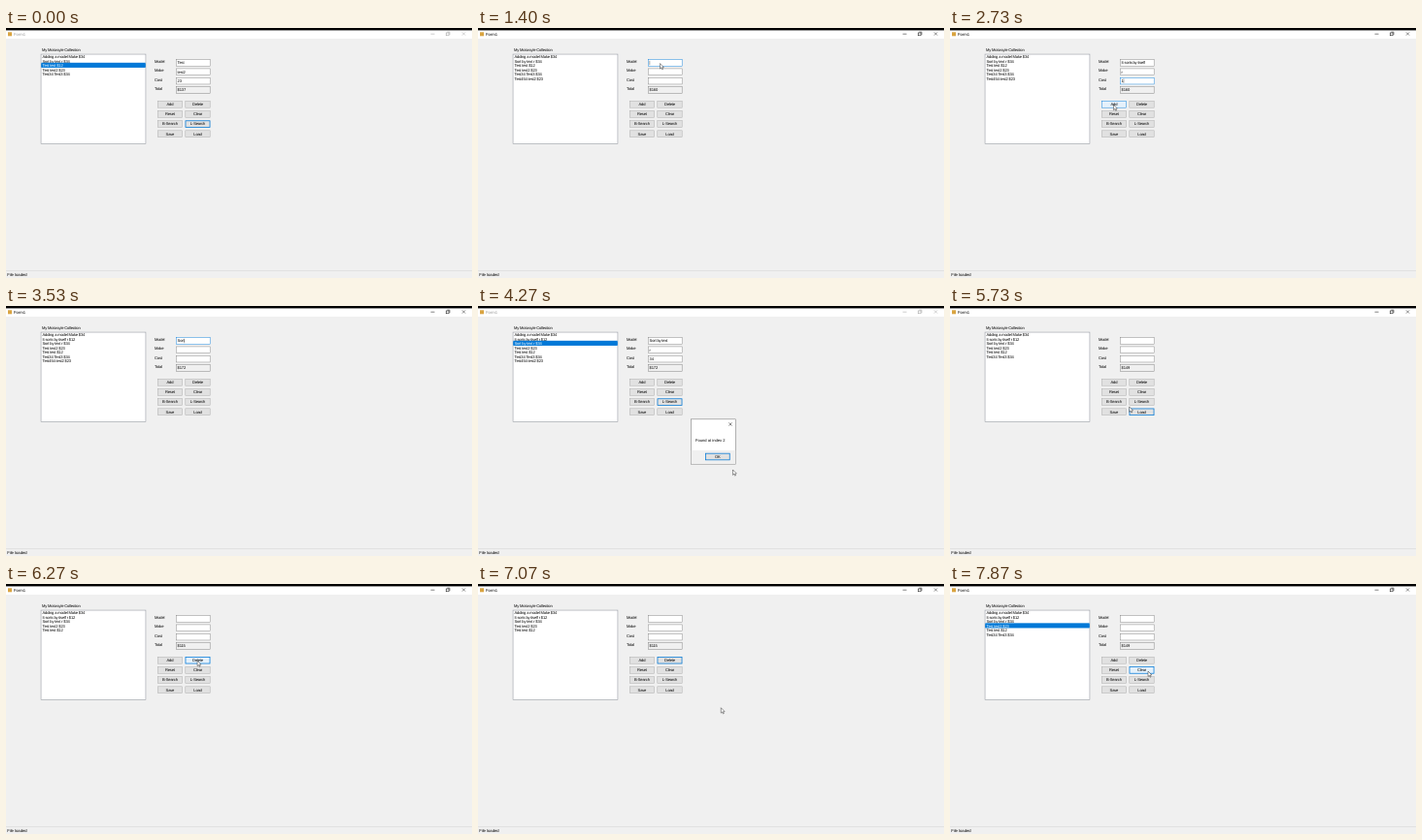
An HTML page with a canvas that plays this animation: 480x258 px, repeating every 7940 ms.

```html
<!DOCTYPE html>
<html lang="en">
<head>
<meta charset="utf-8">
<title>Form demo</title>
<style>
  html, body { margin: 0; width: 100%; height: 100%; overflow: hidden; background: #f0f0f0; }
  canvas { display: block; width: 480px; height: 258px; }
</style>
</head>
<body>
<canvas id="stage"></canvas>
<script>
const LOOP = 7940, TICK = 1000 / 15, MOVE = 330;
const BLUE = '#0078d7', FACE = '#f0f0f0';
const canvas = document.getElementById('stage');
const ctx = canvas.getContext('2d');
const ratio = window.devicePixelRatio || 1;
canvas.width = 480 * ratio;
canvas.height = 258 * ratio;
ctx.scale(ratio, ratio);
ctx.textBaseline = 'middle';
ctx.textRendering = 'geometricPrecision';

// Layout rules
const rowY = n => 27.6 + 4.55 * n;
const fields = ['Model', 'Make', 'Cost', 'Total'].map((name, i) =>
  ({ name, x: 175, y: 32.4 + 9.3 * i, w: 35.4, h: 7.2 }));
const buttons = ['Add', 'Delete', 'Reset', 'Clear', 'B-Search', 'L-Search', 'Save', 'Load'].map((name, i) =>
  ({ name, x: 156 + 28.6 * (i % 2), y: 75 + 10.2 * Math.floor(i / 2), w: 25.8, h: 7.4 }));
const okButton = { name: 'OK', x: 234, y: 151.8, w: 25.6, h: 7.4 };

// The form's behaviour
const bike = (Model, Make, Cost) => ({ Model, Make, Cost });
const start = {
  ...bike('Test', 'test2', '23'),
  bikes: [bike('Adding a model', 'Make', '34'), bike('Sort by text', 'r', '34'),
    bike('Test', 'test', '12'), bike('Test', 'test2', '23'), bike('Test34', 'Test3', '34')],
  pick: 2, focus: 'L-Search', active: false, dialog: '', status: 'File loaded'
};

function reset(s) {
  Object.assign(s, bike('', '', ''), { pick: -1 });
}
function add(s) {
  s.bikes = [...s.bikes, bike(s.Model, s.Make, s.Cost)];
  reset(s);
}
function sort(s) {
  s.bikes = [...s.bikes].sort((a, b) =>
    a.Model.localeCompare(b.Model) || b.Make.localeCompare(a.Make));
}
function remove(s) {
  s.bikes = s.bikes.filter((_, i) => i !== s.pick);
  reset(s);
}
function save(s) {
  s.saved = s.bikes;
  s.status = 'File saved';
}
function load(s) {
  s.bikes = s.saved;
  s.status = 'File loaded';
}
function pick(s, n) {
  Object.assign(s, s.bikes[n], { pick: n });
}
function show(s, message) {
  s.dialog = message;
  s.active = !message;
}

// Events: the pointer reaches its target at the given time.
const go = (at, target, act = () => {}) => ({ at, target, act });
const click = (at, target, act = () => {}) =>
  go(at, target, s => { s.focus = target; act(s); });
const choose = (at, n) => go(at, n, s => { s.focus = ''; pick(s, n); });
const type = (at, until, field, text, from = 0) => ({
  at, typing: true,
  act(s, t) {
    const k = Math.min(1, (t - at) / (until - at));
    s.focus = field;
    s[field] = text.slice(0, from + Math.floor((text.length - from) * k));
  }
});

const story = [
  go(130, [207, 155], s => { s.active = true; }),
  click(400, 'Model'),
  type(470, 670, 'Model', 'Test454', 4),
  click(1000, 'Add', add),
  click(1400, 'Model'),
  type(1600, 2060, 'Model', 'It sorts by itself'),
  type(2130, 2270, 'Make', 'r'),
  type(2330, 2800, 'Cost', '12'),
  go(2670, 'Add'),
  click(2800, 'Add', s => show(s, 'Model added')),
  go(2930, 'OK', s => show(s, '')),
  go(3070, [270, 159], s => { add(s); sort(s); }),
  click(3370, 'Model'),
  type(3400, 3800, 'Model', 'Sort by text'),
  click(4070, 'L-Search', s => { pick(s, 2); show(s, 'Found at index 2'); }),
  go(4270, [262.5, 169]),
  go(4330, 'OK', s => show(s, '')),
  choose(4730, 6),
  click(4930, 'Delete', remove),
  go(5070, [142, 63]),
  click(5400, 'Save', save),
  click(5670, 'Load', load),
  choose(6000, 5),
  click(6270, 'Delete', remove),
  go(6600, [203, 116]),
  go(6930, [257, 130]),
  click(7330, 'Load', load),
  choose(7600, 3),
  click(7800, 'Clear', s => { Object.assign(s, bike('', '', '')); }),
  go(7870, [204, 90])
];
const stops = story.filter(e => 'target' in e);

function spot(target) {
  if (Array.isArray(target)) return target;
  if (typeof target === 'number') return [75, rowY(target) + 2];
  const { x, y } = [...fields, ...buttons, okButton].find(b => b.name === target);
  return [x + 12.5, y + 4.2];
}

function pointerAt(t) {
  const past = stops.filter(e => e.at <= t), prev = past[past.length - 1];
  if (!prev) return null;
  const next = stops[past.length] || prev;
  const begin = Math.max(prev.at, next.at - MOVE);
  const typing = story.some(e => e.typing && e.at > prev.at && e.at <= t);
  if (typing && t < begin) return null;
  const part = next === prev || t < begin ? 0 : (t - begin) / (next.at - begin);
  const k = (1 - Math.cos(Math.PI * part)) / 2;
  const [x0, y0] = spot(prev.target), [x1, y1] = spot(next.target);
  return { x: x0 + (x1 - x0) * k, y: y0 + (y1 - y0) * k };
}

// Drawing helpers
function text(str, x, y, { size = 4.1, spacing = -0.17, color = '#000', align = 'left' } = {}) {
  ctx.font = `${size}px "Liberation Sans", Arial, sans-serif`;
  ctx.letterSpacing = `${spacing}px`;
  ctx.fillStyle = color;
  ctx.textAlign = align;
  ctx.fillText(str, x, y);
}

function rect(x, y, w, h, fill, stroke, line = 0.5) {
  ctx.fillStyle = fill;
  ctx.fillRect(x, y, w, h);
  if (!stroke) return;
  ctx.strokeStyle = stroke;
  ctx.lineWidth = line;
  ctx.strokeRect(x + line / 2, y + line / 2, w - line, h - line);
}

function lines(color, width, ...segments) {
  ctx.strokeStyle = color;
  ctx.lineWidth = width;
  ctx.beginPath();
  for (const [x0, y0, x1, y1] of segments) {
    ctx.moveTo(x0, y0);
    ctx.lineTo(x1, y1);
  }
  ctx.stroke();
}

function cross(x, y, r, color) {
  lines(color, 0.45, [x - r, y - r, x + r, y + r], [x - r, y + r, x + r, y - r]);
}

function button({ name, x, y, w, h }, focused, hot) {
  const edge = focused || hot ? BLUE : '#adadad';
  rect(x, y, w, h, hot ? '#e5f1fb' : '#e1e1e1', edge, focused ? 0.75 : 0.45);
  text(name, x + w / 2, y + h / 2 + 0.2, { align: 'center' });
}

function drawWindow(s) {
  rect(0, 0, 480, 258, FACE);
  rect(0, 0, 480, 11, '#fff');
  rect(0, 0, 480, 2.4, '#000');
  rect(2, 4.3, 4, 4, '#d9a441');
  const ink = s.active ? '#000' : '#999';
  text('Form1', 8, 6.6, { size: 4.2, spacing: 0, color: ink });
  lines(ink, 0.5, [437.5, 6.2, 441.5, 6.2]);
  ctx.strokeRect(453.3, 5, 2.8, 2.8);
  lines(ink, 0.5, [454.3, 4.2, 457, 4.2], [457, 4.2, 457, 7]);
  cross(471.5, 6, 1.6, ink);
  lines('#d7d7d7', 0.6, [0, 250.5, 480, 250.5]);
  text(s.status, 1.2, 254.8, { size: 4.2, spacing: 0 });
}

function drawList(s) {
  text('My Motorcyle Collection', 37, 22.6);
  rect(35.8, 26.8, 108.4, 92.8, '#fff', '#828790');
  s.bikes.forEach(({ Model, Make, Cost }, i) => {
    const picked = i === s.pick;
    if (picked) rect(36.4, rowY(i) - 0.9, 107.2, 4.55, BLUE);
    if (picked) rect(36.4, rowY(i), 107.2, 4.2, BLUE);
    text(`${Model} ${Make} $${Cost}`, 37.5, rowY(i) + 2.3, { color: picked ? '#fff' : '#000' });
  });
}

function drawForm(s, pointer) {
  const total = s.bikes.reduce((sum, b) => sum + Number(b.Cost), 0);
  for (const { name, x, y, w, h } of fields) {
    const focused = s.focus === name, isTotal = name === 'Total';
    const value = isTotal ? `$${total}` : s[name];
    text(name, 153, y + 2.4);
    rect(x, y, w, h, isTotal ? FACE : '#fff', focused ? BLUE : '#7a7a7a', 0.45);
    text(value, x + 1.6, y + 3.8);
    if (focused) {
      const caret = x + 1.8 + ctx.measureText(value).width;
      lines('#000', 0.35, [caret, y + 1.4, caret, y + 5.8]);
    }
  }
  for (const b of buttons) {
    const hot = s.active && pointer && pointer.x > b.x && pointer.x < b.x + b.w &&
      pointer.y > b.y && pointer.y < b.y + b.h;
    button(b, s.focus === b.name, hot);
  }
}

function drawDialog(message) {
  rect(219.3, 116.6, 46.4, 46.8, '#fff', '#666');
  rect(219.8, 149, 45.4, 13.9, FACE);
  cross(260, 122, 1.6, '#000');
  text(message, 224, 138.5, { size: 4.1, spacing: 0 });
  button(okButton, true, false);
}

function drawPointer({ x, y }) {
  const arrow = [[0, 0], [0, 5.4], [1.3, 4.3], [2.2, 6.2], [3, 5.8], [2.2, 4], [3.8, 3.9]];
  ctx.beginPath();
  arrow.forEach(([dx, dy]) => ctx.lineTo(x + dx, y + dy));
  ctx.closePath();
  ctx.fillStyle = '#fff';
  ctx.fill();
  ctx.strokeStyle = '#000';
  ctx.lineWidth = 0.4;
  ctx.stroke();
}

function draw(now) {
  const t = Math.floor(((now % LOOP) + 5) / TICK) * TICK + 5;
  const state = { ...start };
  for (const e of story) if (e.at <= t) e.act(state, t);
  const pointer = pointerAt(t);
  drawWindow(state);
  drawList(state);
  drawForm(state, pointer);
  if (state.dialog) drawDialog(state.dialog);
  if (pointer) drawPointer(pointer);
}

const began = performance.now();
function frame() {
  draw(performance.now() - began);
  requestAnimationFrame(frame);
}
frame();
</script>
</body>
</html>
```
